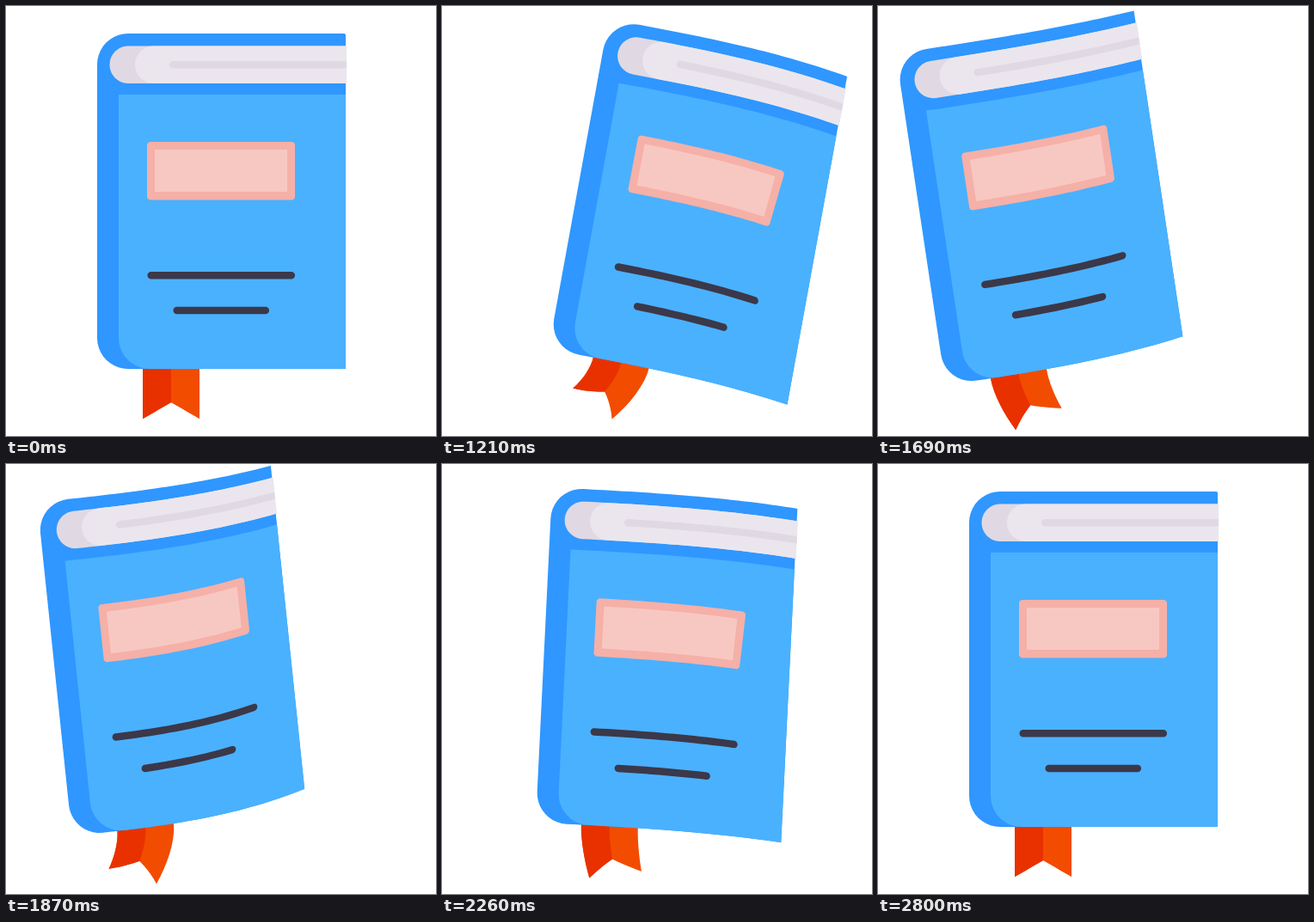
An HTML page with a canvas for the animation above (2.83 s loop, 500 by 500 pixels).

```html
<!DOCTYPE html>
<html lang="en">
<head>
<meta charset="utf-8">
<title>Wobbling book</title>
<style>
  html, body { margin: 0; width: 100%; height: 100%; overflow: hidden; background: #fff; }
  canvas { display: block; }
</style>
</head>
<body>
<canvas id="stage" width="500" height="500"></canvas>
<script>
const ctx = document.getElementById('stage').getContext('2d');
const LOOP = 2830, START = 1030, STEP = 30;
const LEFT = 106, TOP = 32, RIGHT = 395, BOTTOM = 422;
const PIVOT_X = 250, MIDDLE = (TOP + BOTTOM) / 2;

// Ease from rest through [time, value] turning points and back to rest
function sway(t, begin, end, ...turns) {
  let [from, a] = [begin, 0];
  for (const [to, b] of [...turns, [end, 0]]) {
    if (t < to) {
      const u = Math.max(0, (t - from) / (to - from));
      return a + (b - a) * u * u * (3 - 2 * u);
    }
    [from, a] = [to, b];
  }
  return 0;
}

// Fill a polygon, splitting its edges so that it can bend
function fill(points, color, warp) {
  ctx.fillStyle = color;
  ctx.beginPath();
  points.forEach(([x, y], i) => {
    const [nx, ny] = points[(i + 1) % points.length];
    const n = Math.max(1, Math.ceil(Math.hypot(nx - x, ny - y) / 8));
    for (let j = 0; j < n; j++)
      ctx.lineTo(...warp(x + (nx - x) * j / n, y + (ny - y) * j / n));
  });
  ctx.fill();
}

// Outline of a rectangle with separate radii on the left and right
function box(x0, y0, x1, y1, left, right = left, topLeft = left) {
  const points = [];
  const corner = (cx, cy, r, quarter) => {
    const n = r ? 10 : 0;
    for (let i = 0; i <= n; i++) {
      const a = (quarter + (n && i / n)) * Math.PI / 2;
      points.push([cx + r * Math.cos(a), cy + r * Math.sin(a)]);
    }
  };
  corner(x0 + topLeft, y0 + topLeft, topLeft, 2);
  corner(x1 - right, y0 + right, right, 3);
  corner(x1 - right, y1 - right, right, 0);
  corner(x0 + left, y1 - left, left, 1);
  return points;
}

function draw(time) {
  // The pose is held for each step; the book rests before START
  const t = time < START ? 0 : START + STEP * Math.floor((time - START) / STEP);
  const tilt = sway(t, 980, 2620, [1280, 12], [1730, -9], [2160, 3.2]);
  const bend = sway(t, 1000, 2620, [1380, 25], [1830, -23], [2260, 9.6]);
  const shift = sway(t, 1030, 2620, [1340, 25], [1650, -29], [1890, -30], [2280, 3]);
  const swing = sway(t, 1030, 2760, [1150, -.8], [1520, .95], [2020, -1], [2340, .5], [2600, -.1]);

  const down = Math.max(bend, 0), size = Math.abs(bend);
  const edge = RIGHT - (bend > 0 ? .3 : .65) * size;
  const taper = bend > 0 ? .14 : -.6;
  const along = x => (x - LEFT) / (RIGHT - LEFT - 6);

  const sag = (x, y) =>
    bend * along(x) ** 3 * (1 + taper * (MIDDLE - y) / (BOTTOM - TOP));
  const cover = (x, y) => {
    x = Math.min(x, edge);
    return [x, y + sag(x, y)];
  };
  const pages = (x, y) => {
    x = Math.min(x + .2 * size, edge + 1);
    return [x, y + sag(x, y)];
  };
  const print = (x, y) => [x, y + 1.4 * sag(x, y)];
  const label = (x, y) =>
    print(x - (y - 191.7) * 3 * down * along(x) ** 2 / (RIGHT - LEFT), y);
  const ribbon = (x, y) => {
    const v = Math.max(0, (y - BOTTOM) / 58), q = (x - 192) / 33, s = Math.abs(swing);
    const stretch = 1 - .12 * s * v - .345 * swing * q;
    return [x + v ** 1.6 * (36 * swing - 11 * s * q),
            v ? BOTTOM + 58 * v * stretch : y];
  };

  ctx.setTransform(1, 0, 0, 1, 0, 0);
  ctx.fillStyle = '#fff';
  ctx.fillRect(0, 0, 500, 500);
  ctx.translate(PIVOT_X + shift, BOTTOM + .2 * bend);
  ctx.rotate(tilt * Math.PI / 180);
  ctx.translate(-PIVOT_X, -BOTTOM);

  fill([[159, 405], [225, 405], [225, 480], [192, 461], [159, 480]], '#f24c00', ribbon);
  fill([[159, 405], [192, 405], [192, 461], [159, 480]], '#e93100', ribbon);

  fill(box(LEFT, TOP, RIGHT, BOTTOM, 36, 2), '#2f97ff', cover);
  fill(box(131, 103, RIGHT, BOTTOM, 36, 0, 0), '#4ab1ff', cover);

  fill(box(120.5, 46.5, 420, 90, 21.7, 0), '#e0d9e3', pages);
  fill(box(150, 46.5, 420, 90, 21.7, 0), '#ebe6ee', pages);
  fill(box(190, 64, 420, 72.5, 4.2, 0), '#e0d9e3', pages);

  fill(box(164, 158, 336, 225.5, 4), '#f5b0a8', label);
  fill(box(173, 167, 327, 216, 0), '#f7c8c1', label);

  fill(box(164.5, 309, 336, 317.5, 4.2), '#3b3849', print);
  fill(box(194.5, 349.7, 306, 358.2, 4.2), '#3b3849', print);
}

const begin = performance.now();
function tick() {
  draw((performance.now() - begin) % LOOP);
  requestAnimationFrame(tick);
}
tick();
</script>
</body>
</html>
```
